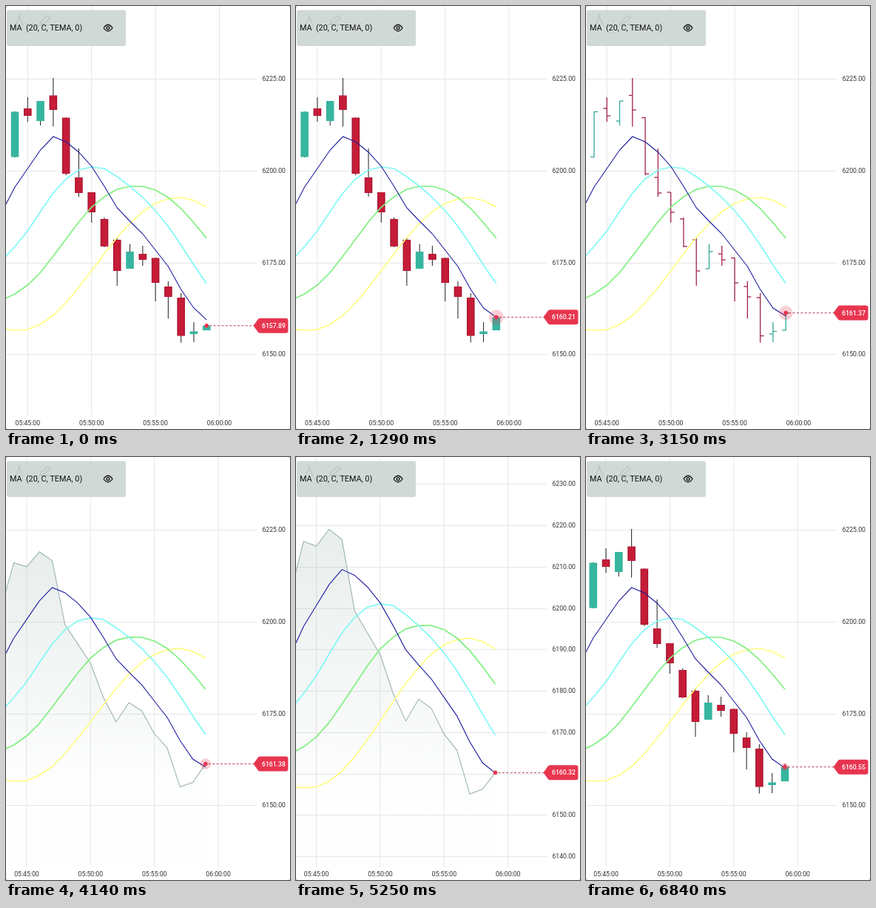
Write an HTML page with a canvas that moves like this. It is 384 by 570 pixels and loops after 6.87 s.

```html
<!DOCTYPE html>
<html lang="en">
<head>
<meta charset="utf-8">
<title>Price chart</title>
<style>
html, body { margin: 0; width: 100%; height: 100%; overflow: hidden; background: #fff; }
canvas { display: block; }
</style>
</head>
<body>
<canvas id="stage" width="384" height="570"></canvas>
<script>
const ctx = document.getElementById('stage').getContext('2d');
const LOOP = 6870, PITCH = 17.28;
const RED = '#c51c38', TEAL = '#36b59f', TAG = '#e8354f';

// One row per minute from 05:44: open, close, high, low, as heights at the coarse scale
const bars = [
  [203.5, 142.5, 142, 204], [138, 148, 123, 156], [155, 128, 128, 161], [120.5, 140, 97, 162.5],
  [150.5, 226, 150, 228], [231, 252, 192, 257], [251, 278, 251, 292], [287, 324, 285, 325],
  [315, 357, 312, 377], [354, 331, 321, 354], [334, 342, 323, 350], [339.5, 373, 339, 398],
  [378, 392, 371, 421], [393, 444.5, 387, 453.5], [442, 438.5, 426, 453]
];

// Averages start at 05:43
const averages = [
  ['#ffff80', 1.7, [435, 437, 436, 429, 417, 400, 379, 357, 334, 312, 293, 277, 266, 260, 258, 262, 271]],
  ['#80f080', 1.7, [396, 388, 376, 359, 337, 314, 291, 271, 257, 247, 243, 243, 248, 258, 273, 292, 313]],
  ['#80faf5', 1.7, [343, 324, 303, 277, 252, 233, 221, 217, 219, 230, 243, 258, 276, 297, 322, 349, 374]],
  ['#1c1c9e', 1.1, [277, 244, 219, 194, 176, 183, 197, 216, 243, 272, 290, 307, 329, 351, 382, 407, 423]]
];

// Time of each tick and the price it moves to
const ticks = [[600, 6160.21], [2300, 6161.37], [3500, 6161.38], [4500, 6160.32], [5450, 6159.93], [6200, 6160.55]];

const clamp = v => Math.max(0, Math.min(1, v));
const ramp = (t, start, length) => clamp((t - start) / length);
const level = price => 222.5 + (6200 - price) * 4.947;

function priceAt(t) {
  let price = 6157.89;
  for (const [start, next] of ticks) {
    const k = 1 - (1 - ramp(t, start, 350)) ** 2;
    price += (next - price) * k;
  }
  return price;
}

function line(color, width, points) {
  ctx.strokeStyle = color;
  ctx.lineWidth = width;
  ctx.beginPath();
  for (const [x, y] of points) ctx.lineTo(x, y);
  ctx.stroke();
}

function disc(x, y, r, color) {
  ctx.fillStyle = color;
  ctx.beginPath();
  ctx.arc(x, y, r, 0, 7);
  ctx.fill();
}

function text(str, x, y, align, color = '#333', font = '8.7px') {
  ctx.font = font + ' Roboto, sans-serif';
  ctx.textAlign = align;
  ctx.textBaseline = 'middle';
  ctx.fillStyle = color;
  ctx.fillText(str, x, y);
}

function legend() {
  ctx.fillStyle = '#d0d9d6';
  ctx.beginPath();
  ctx.roundRect(1, 5.5, 161, 48.5, 3);
  ctx.fill();
  const faint = '#bcc5c2';
  line(faint, 1.3, [[13, 26], [18, 14], [23, 26]]);
  line(faint, 1.3, [[18, 11], [18, 14]]);
  line(faint, 1.3, [[46, 25], [47, 21], [56, 13], [60, 16], [50, 24], [46, 25], [62, 25]]);
  text('MA  (20, C, TEMA, 0)', 5, 30, 'left', '#111', '10.8px');
  ctx.strokeStyle = '#111';
  ctx.lineWidth = 1.3;
  ctx.beginPath();
  ctx.moveTo(132, 29.5);
  ctx.quadraticCurveTo(138, 21, 144, 29.5);
  ctx.quadraticCurveTo(138, 38, 132, 29.5);
  ctx.stroke();
  ctx.beginPath();
  ctx.arc(138, 29.5, 1.9, 0, 7);
  ctx.stroke();
}

function draw(t) {
  const zoom = ramp(t, 4140, 200) - ramp(t, 5380, 260);
  const Y = y => y + zoom * (204 + (y - 222.5) * 1.1276 - y);
  const left = 29.3 - 2.3 * t / LOOP;
  const X = minute => left + (minute - 45) * PITCH;
  const price = priceAt(t), now = level(price);
  const mode = t < 2450 || t >= 5370 ? 'candles' : t < 3450 ? 'bars' : 'area';

  ctx.fillStyle = '#888';
  ctx.fillRect(0, 0, 384, 570);
  ctx.fillStyle = '#fff';
  ctx.beginPath();
  ctx.roundRect(0, 0, 384, 570, 2);
  ctx.fill();

  // Grid and axes
  const step = zoom > 0.5 ? 10 : 25;
  for (let v = 6250; v >= 6130; v -= step) {
    const value = Math.floor(v / step) * step, y = Y(level(value));
    if (y < 5 || y > 550) continue;
    line('#e6e6e6', 1, [[0, Math.floor(y) + 0.5], [339, Math.floor(y) + 0.5]]);
    text(value.toFixed(2), 378, y, 'right');
  }
  for (let m = 45; m <= 60; m += 5) {
    line('#e6e6e6', 1, [[X(m), 0], [X(m), 552]]);
    text(m < 60 ? `05:${m}:00` : '06:00:00', X(m), 562.5, 'center');
  }

  // Price series
  const high = level(Math.max(price, t < 2300 ? 0 : 6161.38));
  const series = [...bars, [437, now, Math.min(now, high), 437]];
  if (mode === 'area') {
    const points = [[X(43), Y(203.5)], ...series.map((b, i) => [X(44 + i), Y(b[1])])];
    const fade = ctx.createLinearGradient(0, Y(128), 0, Y(445));
    fade.addColorStop(0, 'rgba(140,170,165,.2)');
    fade.addColorStop(1, 'rgba(140,170,165,.01)');
    line('#9bb5b1', 1.1, points);
    ctx.lineTo(X(59), 552);
    ctx.lineTo(X(43), 552);
    ctx.fillStyle = fade;
    ctx.fill();
  } else series.forEach(([open, close, top, low], i) => {
    const x = X(44 + i), up = close < open;
    if (mode === 'bars') {
      const color = up ? '#35a898' : '#a3234a';
      line(color, 1.3, [[x, Y(top)], [x, Y(low)]]);
      line(color, 1.3, [[x - 5, Y(open)], [x, Y(open)]]);
      line(color, 1.3, [[x, Y(close)], [x + 5, Y(close)]]);
      return;
    }
    line('#333', 1.1, [[x, Y(top)], [x, Y(low)]]);
    const y = Y(Math.min(open, close)), h = Math.abs(Y(open) - Y(close));
    ctx.fillStyle = up ? TEAL : '#a9142f';
    ctx.fillRect(x - 5.3, y, 10.6, h);
    if (!up) {
      ctx.fillStyle = RED;
      ctx.fillRect(x - 4, y + 0.5, 8, h - 1);
    }
  });

  // Moving averages; the newest point of the fastest one follows the price
  for (const [color, width, values] of averages) {
    const points = values.map((y, i) => [X(43 + i), Y(y)]);
    if (width < 1.5) points[16][1] = Y(level(6159.5 + 0.3 * (price - 6157.89)));
    line(color, width, points);
  }

  // Current price marker
  const x = X(59), y = Y(now);
  const pulse = Math.sin(Math.PI * (t % 875) / 875);
  ctx.setLineDash([3, 2.4]);
  line('#b5415a', 1, [[x + 4, y], [336, y]]);
  ctx.setLineDash([]);
  disc(x, y, 10 * pulse, 'rgba(232,53,79,.24)');
  disc(x, y, 2.8, TAG);

  ctx.fillStyle = TAG;
  ctx.beginPath();
  ctx.moveTo(334.5, y);
  ctx.lineTo(341, y - 9);
  ctx.quadraticCurveTo(342, y - 10, 344, y - 10);
  ctx.arcTo(381.5, y - 10, 381.5, y, 3);
  ctx.arcTo(381.5, y + 10, 344, y + 10, 3);
  ctx.lineTo(344, y + 10);
  ctx.quadraticCurveTo(342, y + 10, 341, y + 9);
  ctx.fill();
  text(price.toFixed(2), 378, y + 0.5, 'right', '#fff', '500 8.7px');

  legend();
}

const start = performance.now();
function frame() {
  draw((performance.now() - start) % LOOP);
  requestAnimationFrame(frame);
}
frame();
</script>
</body>
</html>
```
